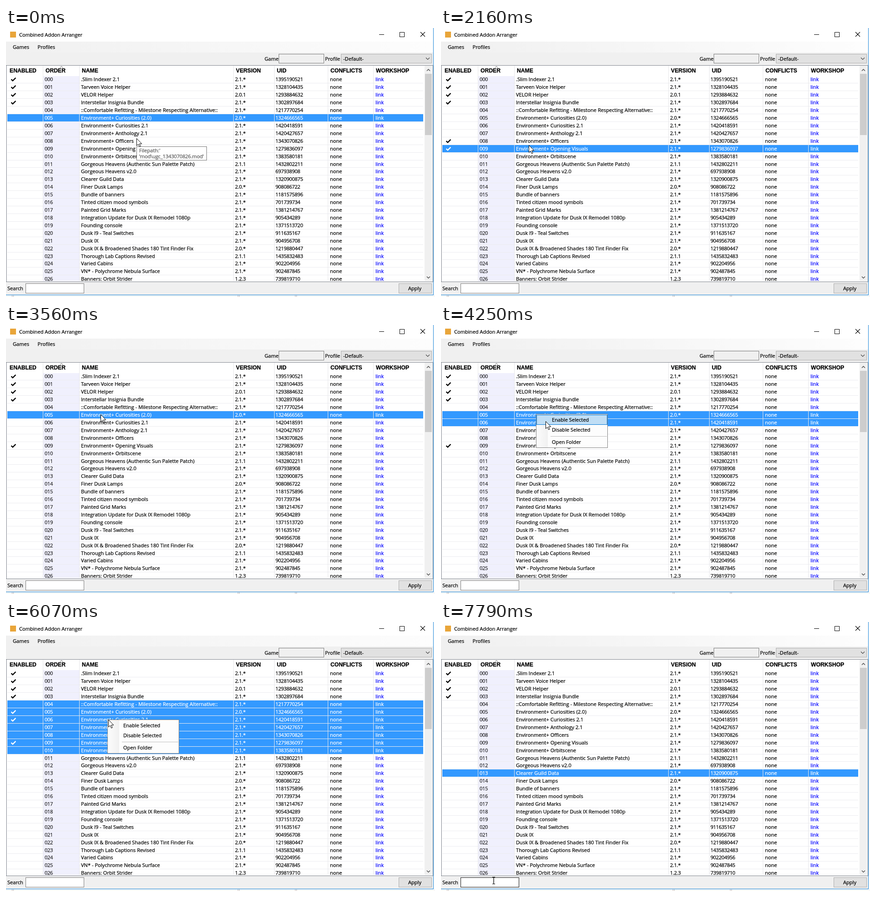
Recreate the animation shown at these times as an HTML page with a canvas. Size 944 by 593 pixels, loop 7.99 s.

```html
<!DOCTYPE html>
<html lang="en">
<head>
<meta charset="utf-8">
<title>Addon list</title>
<style>
html, body { margin: 0; width: 100%; height: 100%; overflow: hidden; background: #fff; }
canvas { display: block; width: 944px; height: 593px; }
</style>
</head>
<body>
<canvas id="stage" width="944" height="593"></canvas>
<script>
const ctx = document.getElementById('stage').getContext('2d', { alpha: false });
const LOOP = 7990, STEP = 75;
const LIST_TOP = 105.4, ROW = 16.92;
const UI = '11.1px "Open Sans", "Noto Sans", sans-serif';
const HEAD = 'bold 12.2px "Liberation Sans", Arial, sans-serif';
const SELECT = '#3399ff';

// name | uid | version (2.1.* when left out)
const rows = `.Slim Indexer 2.1|1395190521
Tarveen Voice Helper|1328104435
VELOR Helper|1293884632|2.0.1
Interstellar Insignia Bundle|1302897684
::Comfortable Refitting - Milestone Respecting Alternative::|1217770254
Environment+ Curiosities (2.0)|1324666565|2.0.*
Environment+ Curiosities 2.1|1420418591
Environment+ Anthology 2.1|1420427657
Environment+ Officers|1343070826
Environment+ Opening Visuals|1279836097
Environment+ Orbitscene|1383580181
Gorgeous Heavens (Authentic Sun Palette Patch)|1432802211|2.1.1
Gorgeous Heavens v2.0|697938908
Clearer Guild Data|1320900875
Finer Dusk Lamps|908086722|2.0.*
Bundle of banners|1181575896
Tinted citizen mood symbols|701739734
Painted Grid Marks|1381214767
Integration Update for Dusk IX Remodel 1080p|905434289
Founding console|1371513720
Dusk I9 - Teal Switches|911635167
Dusk IX|904956708
Dusk IX & Broadened Shades 180 Tint Finder Fix|1219880447|2.0.*
Thorough Lab Captions Revised|1435832483|2.1.1
Varied Cabins|902204956
VN* - Polychrome Nebula Surface|902487845
Banners: Orbit Strider|739819710|1.2.3`.split('\n').map(line => {
  const [name, uid, version = '2.1.*'] = line.split('|');
  return { name, uid, version };
});

const rowTop = i => Math.round(LIST_TOP + ROW * i);
const rowAt = y => Math.floor((y - LIST_TOP) / ROW);

// Replays the session up to time t and returns the resulting state
function stateAt(t) {
  const s = { x: 287, y: 243, anchor: 5, first: 5, last: 5, ticked: new Set([0, 1, 2, 3]) };

  function move(from, to, x, y) {
    if (t < from) return;
    const steps = Math.round((to - from) / STEP) + 1;
    const f = t >= to ? 1 : (Math.floor((t - from) / STEP) + 1) / steps;
    s.x += (x - s.x) * Math.min(f, 1);
    s.y += (y - s.y) * Math.min(f, 1);
  }
  function click(at, extend) {
    if (t < at) return;
    const row = rowAt(s.y);
    if (!extend) s.anchor = row;
    s.first = Math.min(s.anchor, row);
    s.last = Math.max(s.anchor, row);
  }
  function doubleClick(at) {
    click(at);
    if (t < at + 2 * STEP) return;
    const row = rowAt(s.y);
    if (!s.ticked.delete(row)) s.ticked.add(row);
  }
  function hint(from, to) {
    if (t >= from && t < to) s.tip = { row: rowAt(s.y), x: s.x, y: s.y + 18 };
  }
  function openMenu(at) {
    if (t >= at) s.menu = { x: s.x, y: s.y };
  }
  function choose(at, enable) {
    if (t < at) return;
    s.menu = null;
    for (let i = s.first; i <= s.last; i++) enable ? s.ticked.add(i) : s.ticked.delete(i);
  }

  // Tick two rows, untick the first again
  hint(0, 120);
  move(120, 280, 262, 251);
  hint(520, 600);
  move(600, 830, 190, 249);
  doubleClick(830);
  move(1060, 1140, 190, 268);
  hint(1290, 1470);
  doubleClick(1690);
  move(1920, 2240, 194, 255);
  doubleClick(2690);

  // Enable a pair through the menu
  move(2840, 3080, 206, 216);
  move(3150, 3300, 208, 197);
  click(3500);
  move(3580, 3720, 208, 211);
  click(3790, true);
  move(3870, 3940, 209, 196);
  openMenu(4090);
  move(4250, 4250, 230, 212);
  move(4340, 4340, 230, 232);
  move(4490, 4650, 231, 214);
  choose(4860, true);

  // Disable a longer range
  move(4940, 5270, 214, 280);
  click(5350);
  move(5420, 5670, 217, 180);
  click(5740, true);
  move(5810, 5810, 223, 215);
  openMenu(6070);
  move(6070, 6070, 225, 215);
  move(6140, 6350, 238, 245);
  move(6590, 6810, 240, 256);
  choose(6970, false);

  // Pick one row, then go to the search box
  move(7300, 7380, 205, 330);
  click(7460);
  move(7540, 7790, 116, 570);

  s.x = Math.round(s.x);
  s.y = Math.round(s.y);
  return s;
}

function box(x, y, w, h, fill, edge) {
  ctx.fillStyle = fill;
  ctx.fillRect(x, y, w, h);
  if (!edge) return;
  ctx.strokeStyle = edge;
  ctx.lineWidth = 1;
  ctx.strokeRect(x + .5, y + .5, w - 1, h - 1);
}

function text(s, x, y, color = '#000', spacing = 0, font = UI) {
  ctx.font = font;
  ctx.letterSpacing = spacing + 'px';
  ctx.fillStyle = ctx.strokeStyle = color;
  ctx.lineWidth = .25;
  ctx.fillText(s, x, y);
  ctx.strokeText(s, x, y);
}

function line(points, color, width = 1) {
  ctx.beginPath();
  points.forEach(([x, y]) => ctx.lineTo(x, y));
  ctx.strokeStyle = color;
  ctx.lineWidth = width;
  ctx.stroke();
}

// Arrow head with its tip at x, y; h > 0 points up
function chevron(x, y, h, color, width) {
  const w = Math.abs(h);
  line([[x - w, y + h], [x, y], [x + w, y + h]], color, width);
}

function fade(x, y, w, h, from, to) {
  const g = ctx.createLinearGradient(x, 0, x + w, 0);
  g.addColorStop(0, from);
  g.addColorStop(1, to);
  box(x, y, w, h, g);
}

function drawWindow(searchHot) {
  box(0, 0, 944, 593, '#fff');
  box(0, 30, 940, 558, '#f0f0f0');
  fade(0, 30, 940, 24, '#f0f0f0', '#fdfdfd');
  box(9, 8, 13, 13, '#e9a53a');
  text('Combined Addon Arranger', 29, 19);
  line([[821, 14.5], [832, 14.5]], '#000');
  ctx.strokeRect(866.5, 9.5, 10, 10);
  line([[912, 9], [922, 19]], '#000', 1.1);
  line([[922, 9], [912, 19]], '#000', 1.1);
  text('Games', 15, 46);
  text('Profiles', 69.5, 46);

  text('Game', 569, 72);
  box(600, 57, 100, 21, '#f0f0f0', '#7a7a7a');
  text('Profile', 702, 72);
  box(737, 57, 200, 21, '#e1e1e1', '#adadad');
  text('-Default-', 742, 72);
  chevron(928, 69.5, -4, '#444', 1.1);

  text('Search', 3, 578);
  box(43, 563, 129, 22, '#fff', searchHot ? '#171717' : '#7a7a7a');
  box(864, 563, 73, 22, '#e1e1e1', '#adadad');
  text('Apply', 885, 578);

  box(0, 588, 941, 1, '#1883d7');
  box(940, 0, 1, 589, '#1883d7');
  box(0, 589, 944, 4, '#f8f8f8');
  for (const x of [13, 510, 636]) {
    box(x, 589, 1, 4, '#b4b8bc');
    box(x + 3, 589, 1, 4, '#b4b8bc');
  }
}

function drawRow(row, i, on, ticked) {
  const y = rowTop(i), end = rowTop(i + 1) - 1, base = y + 12;
  const ink = on ? '#fff' : '#000';
  if (on) box(2, y, 916, end - y, SELECT);
  box(2, end, 916, 1, '#ececf0');
  if (ticked) line([[11.5, y + 8.2], [14.8, y + 11.4], [21.3, y + 4.8]], ink, 2.4);
  text(String(i).padStart(3, '0'), 85, base, on ? '#fff' : '#222', -.3);
  text(row.name, 165, base, ink);
  text(row.version, 504, base, ink, -.3);
  text(row.uid, 593, base, ink, -.3);
  text('none', 713, base, ink);
  text('link', 813, base, on ? '#fff' : '#0000ff');
}

function drawList(s) {
  box(0, 82, 940, 478, '#fff', '#828790');
  ctx.save();
  ctx.beginPath();
  ctx.rect(1, 83, 938, 475);
  ctx.clip();
  box(82, 106, 79, 452, '#f0f0fd');
  rows.forEach((row, i) => drawRow(row, i, i >= s.first && i <= s.last, s.ticked.has(i)));

  const heads = { ENABLED: 8, ORDER: 87, NAME: 167, VERSION: 506, UID: 596, CONFLICTS: 714, WORKSHOP: 814 };
  for (const h in heads) {
    box(heads[h] - 6, 83, 1, 475, '#e6e6e9');
    text(h, heads[h], 98, '#000', 0, HEAD);
  }
  chevron(122, 84.5, 4, '#555');

  box(921, 83, 17, 475, '#f0f0f0');
  box(922, 101, 15, 135, '#cdcdcd');
  chevron(929.5, 91, 3.5, '#505050', 1.5);
  chevron(929.5, 551.5, -3.5, '#505050', 1.5);
  ctx.restore();
}

function drawTip({ row, x, y }) {
  box(x, y, 155, 31, '#fff', '#767676');
  text("Filepath:'", x + 6, y + 13, '#575757');
  text(`'mod\\ugc_${rows[row].uid}.mod'`, x + 6, y + 26, '#575757', -.15);
}

function drawMenu({ x, y }, p) {
  box(x, y, 158, 75, '#fdfdfd', '#808080');
  fade(x + 1, y + 1, 25, 73, '#fcfcfc', '#f0f0f0');
  box(x + 32, y + 49, 124, 1, '#bdbdbd');
  const items = { 'Enable Selected': 2, 'Disable Selected': 24, 'Open Folder': 51 };
  for (const label in items) {
    const top = y + items[label];
    const hot = p.x > x + 2 && p.y >= top && p.y < top + 22;
    if (hot) box(x + 1, top, 156, 22, '#c0def5', '#0078d7');
    text(label, x + 35, top + 15);
  }
}

function drawBeam(x, y) {
  line([[x, y - 7], [x, y + 7]], '#000', 1.3);
  for (const end of [-7.5, 7.5]) line([[x - 3, y + end], [x + 3, y + end]], '#000');
}

function drawArrow(x, y) {
  ctx.beginPath();
  for (const [dx, dy] of [[0, 0], [0, 16], [3.7, 12.7], [6.3, 18.4], [8.7, 17.3], [6.2, 11.7], [11.3, 11.7]]) {
    ctx.lineTo(x + .5 + dx, y + .5 + dy);
  }
  ctx.closePath();
  ctx.fillStyle = '#fff';
  ctx.fill();
  ctx.strokeStyle = '#000';
  ctx.lineWidth = 1;
  ctx.stroke();
}

function draw(now) {
  const s = stateAt(now % LOOP);
  const overSearch = s.y > 562;
  drawWindow(overSearch);
  drawList(s);
  if (s.tip) drawTip(s.tip);
  if (s.menu) drawMenu(s.menu, s);
  (overSearch ? drawBeam : drawArrow)(s.x, s.y);
}

let start;
function tick(now) {
  start ??= now;
  draw(now - start);
  requestAnimationFrame(tick);
}
draw(0);
requestAnimationFrame(tick);
</script>
</body>
</html>
```
